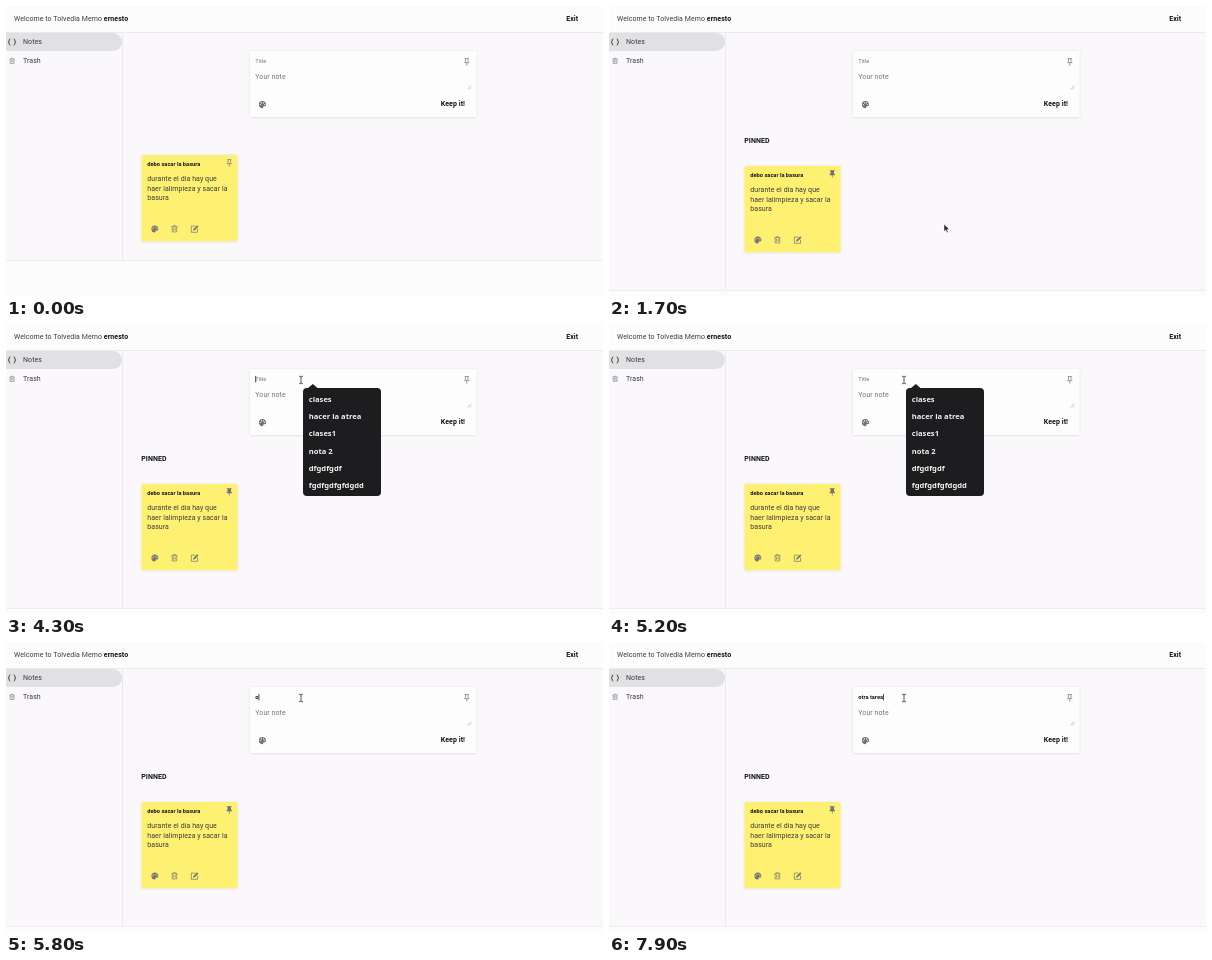
Write an HTML page that moves like this. It is 597x290 px and loops after 8 s.

```html
<!DOCTYPE html>
<html lang="en">
<head>
<meta charset="utf-8">
<title>Notes</title>
<style>
html, body { margin: 0; width: 100%; height: 100%; overflow: hidden; background: #fdfcfd; }
svg { display: block; width: 100vw; height: 100vh; }
text { font: 400 7px Roboto, sans-serif; letter-spacing: .07px; fill: #3b3b3d; white-space: pre; }
.b { font-weight: 700; fill: #151517; }
.s { font-size: 5.7px; letter-spacing: 0; }
.hint { fill: #757575; }
#menu text { font: 600 7.6px "Noto Sans", sans-serif; letter-spacing: 0; fill: #f2f2f2; }
.icon { fill: #737377; }
.line { fill: none; stroke: #77777a; stroke-width: 2; }
</style>
</head>
<body>
<svg viewBox="0 0 597 290" preserveAspectRatio="none">
  <defs>
    <filter id="soft" x="-10%" y="-10%" width="120%" height="125%">
      <feDropShadow dx="0" dy=".4" stdDeviation=".9" flood-color="#000" flood-opacity=".14"/>
    </filter>
    <symbol id="palette" viewBox="0 0 24 24">
      <path class="icon" fill-rule="evenodd" d="M12 2a10 10 0 0 0 0 20c1.500 0 2.300-1.200 2-2.300-.6-1.700.3-3 2-3h2.500c2 0 3.500-1.700 3.500-4C22 6.500 17.500 2 12 2z
        M6 10a1.700 1.700 0 1 1 0 3.400a1.700 1.700 0 1 1 0-3.400z M9 5.600a1.700 1.700 0 1 1 0 3.400a1.700 1.700 0 1 1 0-3.400z
        M15 5.600a1.700 1.700 0 1 1 0 3.400a1.700 1.700 0 1 1 0-3.400z M18 10a1.700 1.700 0 1 1 0 3.400a1.700 1.700 0 1 1 0-3.400z"/>
    </symbol>
    <symbol id="bin" viewBox="0 0 24 24">
      <path class="line" d="M3 6H21M9 5V3H15V5M5.500 6V21H18.500V6M9.500 9.500V17.500M14.500 9.500V17.500"/>
    </symbol>
    <symbol id="edit" viewBox="0 0 24 24">
      <path class="line" d="M14 4H3V21H20V11"/>
      <path class="icon" d="M8 17l1-5L19 2l3.500 3.500L12.500 15.500z"/>
    </symbol>
    <symbol id="pin" viewBox="0 0 24 24">
      <path class="line" d="M6 3H18M8.500 3V11L5.500 14.500H18.500L15.500 11V3M12 15V23"/>
    </symbol>
    <symbol id="pinned" viewBox="0 0 24 24">
      <path class="icon" d="M5 2H19V4.500H17V11L20 14.500V16.500H13V23H11V16.500H4V14.500L7 11V4.500H5z"/>
    </symbol>
  </defs>

  <rect width="597" height="290" fill="#fdfcfd"/>
  <g id="page">
    <rect id="main" y="26" width="597" fill="#faf8fb"/>
    <rect id="edge" x="116" y="26" width="1" fill="#ebe9ec"/>
    <rect id="foot" width="597" height="1" fill="#eeecef"/>
  </g>
  <rect width="597" height="26" fill="#fcfcfc"/>
  <rect y="26" width="597" height="1" fill="#ebeaec"/>
  <text x="8" y="15">Welcome to Tolvedia Memo <tspan class="b">ernesto</tspan></text>
  <text class="b" x="560.2" y="15">Exit</text>

  <path d="M0 27H107a9 9 0 0 1 0 18H0z" fill="#e1e0e2"/>
  <path d="M4.300 32.800Q2.900 33 3.100 35Q3 35.900 2.200 36Q3 36.100 3.100 37Q2.900 39 4.300 39.200M7.700 32.800Q9.100 33 8.900 35Q9 35.900 9.800 36Q9 36.100 8.900 37Q9.100 39 7.700 39.200" fill="none" stroke="#333" stroke-width=".9"/>
  <text x="17" y="38">Notes</text>
  <use href="#bin" x="2.600" y="51.300" width="7" height="7"/>
  <text x="17" y="57">Trash</text>

  <rect x="244" y="45" width="226.500" height="66" rx="1" fill="#fefefe" filter="url(#soft)" opacity=".95"/>
  <text id="title" class="s" x="249.300" y="57"></text>
  <rect id="caret" y="52" width=".8" height="6.400" fill="#222"/>
  <text class="hint" x="249.300" y="72.500">Your note</text>
  <path d="M461.500 83.300L465.200 79.600M463.600 83.300L465.200 81.700" stroke="#8c8c8e" stroke-width=".5"/>
  <use href="#pin" x="456.500" y="51.500" width="8.500" height="8.500"/>
  <use href="#palette" x="252.200" y="94.300" width="8.600" height="8.600"/>
  <text class="b" x="434.800" y="99.700">Keep it!</text>

  <text id="heading" class="b" x="135.200" y="137">PINNED</text>
  <g id="card">
    <rect x="135.500" y="149" width="96" height="86.300" rx="1.500" fill="#fef172" filter="url(#soft)"/>
    <text class="b s" x="141.300" y="160">debo sacar la basura</text>
    <text x="141.300" y="175.200">durante el dia hay que</text>
    <text x="141.300" y="184.500">haer lalimpieza y sacar la</text>
    <text x="141.300" y="193.800">basura</text>
    <use id="mark" x="219" y="152.500" width="8.500" height="8.500"/>
    <use href="#palette" x="144.700" y="218.700" width="8.400" height="8.400"/>
    <use href="#bin" x="164.200" y="218.600" width="8.400" height="8.400"/>
    <use href="#edit" x="184.200" y="218.600" width="8.800" height="8.800"/>
  </g>

  <g id="menu">
    <path d="M301.500 64.500L306.800 60L312.100 64.500z" fill="#1d1d1f"/>
    <rect x="297" y="64" width="78" height="108" rx="4" fill="#1d1d1f"/>
  </g>

  <g id="arrow">
    <path d="M0 0V7.600L1.800 6L3 8.800L4.300 8.200L3.100 5.500H5.300z" fill="#2a2a2c" stroke="#fff" stroke-width=".5"/>
  </g>
  <g id="hand">
    <path d="M-1.600-4Q-.8-4.800 0-4V-.9L3.200-.2Q4.200 0 4.200 1L3.600 4.500H-1.200L-3.400 1.300Q-3.200.3-1.600 1z" fill="#2a2a2c" stroke="#fff" stroke-width=".4"/>
  </g>
  <g id="beam">
    <path d="M-2-3.800Q0-3.800 0-2.800Q0-3.800 2-3.800M0-3V3M-2 3.800Q0 3.800 0 2.800Q0 3.800 2 3.800" fill="none" stroke="#4a4a4c" stroke-width=".9"/>
  </g>
</svg>
<script>
const LOOP = 8000, STEP = 100;
const $ = id => document.getElementById(id);
const set = (id, attrs) => { for (const k in attrs) $(id).setAttribute(k, attrs[k]); };

["clases", "hacer la atrea", "clases1", "nota 2", "dfgdfgdf", "fgdfgdfgfdgdd"].forEach((word, i) => {
  const row = document.createElementNS("http://www.w3.org/2000/svg", "text");
  row.textContent = word;
  row.setAttribute("x", 302.8);
  row.setAttribute("y", 77.6 + i * 17.3);
  $("menu").append(row);
});

// [time, x, y]
const path = [
  [500, 262, 190], [900, 224, 158], [1400, 224, 158], [1600, 300, 250], [1800, 370, 186],
  [2000, 370, 186], [2300, 375.5, 175.5], [3200, 375.5, 175.5], [3300, 375.8, 172.3],
  [3500, 368, 150], [4000, 295, 56], [8000, 295, 56]
];
// [time, value]
const shape = [[0, ""], [500, "arrow"], [900, "hand"], [1400, "arrow"], [3900, "beam"]];
const typed = [
  [0, ""], [5500, "o"], [5900, "ot"], [6100, "otr"], [6300, "otra"], [6400, "otra "],
  [6900, "otra ta"], [7100, "otra tar"], [7300, "otra tare"], [7500, "otra tarea"]
];
const caretOn = [[0, 0], [4200, 1], [4800, 0], [5400, 1]];
const menuShown = [[0, 0], [4200, .6], [4300, 1], [5600, .78], [5700, 0]];
const pinnedAt = 1300;

const at = (steps, t) => steps.findLast(s => s[0] <= t)[1];

function along(t) {
  const i = path.findIndex(p => p[0] > t);
  if (i < 1) return path[0].slice(1);
  const [t0, x0, y0] = path[i - 1], [t1, x1, y1] = path[i];
  const k = (t - t0) / (t1 - t0), e = k * k * (3 - 2 * k);
  return [x0 + (x1 - x0) * e, y0 + (y1 - y0) * e];
}

function draw(t) {
  const pinned = t >= pinnedAt, end = pinned ? 284 : 254;
  set("main", { height: end - 26 });
  set("edge", { height: end - 26 });
  set("foot", { y: end });
  set("heading", { opacity: +pinned });
  set("card", { transform: `translate(0 ${pinned ? 11 : 0})` });
  set("mark", { href: pinned ? "#pinned" : "#pin" });

  const words = at(typed, t), title = $("title");
  title.textContent = words || "Title";
  title.setAttribute("class", words ? "b s" : "s hint");
  const width = words ? title.getComputedTextLength() : 0;
  set("caret", { x: 249.3 + width, opacity: at(caretOn, t) });

  const shown = at(menuShown, t), scale = shown < 1 ? .985 : 1;
  set("menu", { opacity: shown, transform: `translate(336 118) scale(${scale}) translate(-336 -118)` });

  const pointer = at(shape, t), [x, y] = along(t);
  for (const id of ["arrow", "hand", "beam"])
    set(id, { opacity: +(id === pointer), transform: `translate(${x} ${y})` });
}

const start = performance.now();
function tick() {
  const t = (performance.now() - start) % LOOP;
  draw(Math.floor(t / STEP) * STEP);
  requestAnimationFrame(tick);
}
tick();
</script>
</body>
</html>
```
